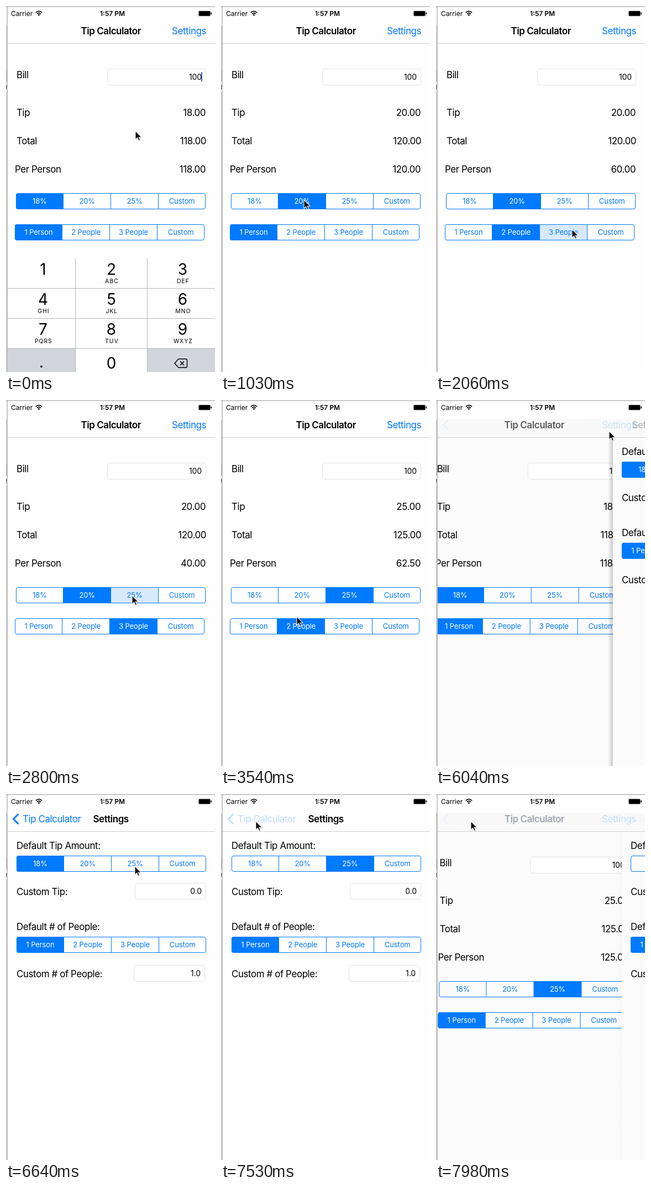
These frames come from a looping animation (378 by 659 pixels, 8000 ms). An HTML page:

```html
<!DOCTYPE html>
<html lang="en">
<head>
<meta charset="utf-8">
<title>Tip Calculator</title>
<style>
html, body { margin: 0; width: 100%; height: 100%; overflow: hidden; background: #fefefe; }
svg { display: block; width: 378px; height: 659px; }
text { font: 17px Inter, "Open Sans", sans-serif; letter-spacing: -.45px; fill: #000; white-space: pre; }
.bold { font-weight: 600; }
.blue { fill: #007aff; }
.end { text-anchor: end; }
.mid { text-anchor: middle; }
.small { font-size: 12px; letter-spacing: 0; }
.entry { font-size: 14px; letter-spacing: -.1px; }
.seg text { font-size: 13px; letter-spacing: -.1px; fill: #007aff; }
.cell rect { fill: none; }
.cell.down rect { fill: #d8e9fc; }
.cell.on rect { fill: #007aff; }
.cell.on text { fill: #fff; }
.frame { fill: none; stroke: #007aff; }
.field { fill: #fff; stroke: #e3e3e3; }
.digit { font-size: 28px; letter-spacing: 0; }
.letters { font-size: 10.5px; letter-spacing: .9px; }
.rule { stroke: #b6b8bb; }
</style>
</head>
<body>
<svg id="stage" viewBox="0 0 378 659"></svg>
<script>
const LOOP = 8000, STEP = 147.5, BLUE = '#007aff';
const TIPS = [18, 20, 25], BILL = 100;
const $ = id => document.getElementById(id);

const text = (x, y, str, cls = '', id = '') =>
  `<text x="${x}" y="${y}" class="${cls}"${id && ` id="${id}"`}>${str}</text>`;
const rect = (x, y, w, h, rest = '') =>
  `<rect x="${x}" y="${y}" width="${w}" height="${h}" ${rest}/>`;
const field = (x, y, w, value) =>
  rect(x + .5, y + .5, w, 29, 'rx="4" class="field"') + text(x + w - 7, y + 20, value, 'entry end');

function segments(id, x, y, labels) {
  const cells = labels.map((label, i) =>
    `<g class="cell">${rect(i * 85.75, 0, 86, 29)}${text(i * 85.75 + 43, 19.2, label, 'mid')}</g>`).join('');
  const dividers = [1, 2, 3].map(i => `M${i * 86 - .5} 0V29`).join('');
  return `<g class="seg" id="${id}" transform="translate(${x} ${y})">
    <g clip-path="url(#pill)">${cells}</g>
    ${rect(.5, .5, 342, 28, 'rx="3.5" class="frame"')}<path d="${dividers}" class="frame"/></g>`;
}
const tipLabels = ['18%', '20%', '25%', 'Custom'];
const peopleLabels = ['1 Person', '2 People', '3 People', 'Custom'];

function keyboard() {
  const centers = [67, 190.5, 319.5];
  const letters = ['', 'ABC', 'DEF', 'GHI', 'JKL', 'MNO', 'PQRS', 'TUV', 'WXYZ'];
  const keys = letters.map((s, i) => {
    const x = centers[i % 3], y = 454 + 54 * Math.floor(i / 3);
    return text(x, y + 30, i + 1, 'digit mid') + text(x + .8, y + 45, s, 'letters mid');
  }).join('');
  return `<g id="keyboard">${rect(3, 454, 375, 216, 'fill="#fefefe"')}
    ${rect(3, 616, 122, 54, 'fill="#d2d5db"')}${rect(256, 616, 122, 54, 'fill="#d2d5db"')}
    <path class="rule" d="M125.5 454V670M255.5 454V670M3 508.5H378M3 562.5H378M3 616.5H378"/>
    ${keys}${text(190.5, 653, '0', 'digit mid')}${text(64, 651, '.', 'digit mid')}
    <path d="M312 635.5H325Q327.500 635.500 327.500 638V648.500Q327.500 651 325 651H312L305 643.200ZM315 639.500L322 647M322 639.500L315 647"
      fill="none" stroke="#000" stroke-width="1.4" stroke-linejoin="round"/></g>`;
}

$('stage').innerHTML = `
<defs>
  <clipPath id="pill">${rect(0, 0, 343, 29, 'rx="4"')}</clipPath>
  <clipPath id="screen">${rect(3, 2, 375, 657)}</clipPath>
  <linearGradient id="fade"><stop stop-color="#000" stop-opacity="0"/><stop offset="1" stop-color="#000"/></linearGradient>
</defs>
${rect(0, 0, 378, 659, 'fill="#cbcbcb"')}
${rect(0, 3, 2, 33, 'fill="#ececec"')}${rect(0, 116, 2, 20, 'fill="#bcbcbc"')}${rect(0, 136, 2, 18, 'fill="#dedede"')}
<path d="M0 36.500H2M2.500 0V659" stroke="#b0b0b0"/>
<path d="M.5 142V150M0 144.500H2" stroke="#555"/>
<g clip-path="url(#screen)">
  ${rect(3, 2, 375, 657, 'fill="#fefefe"')}
  <g id="main">
    ${rect(-120, 68, 520, 600, 'class="paper"')}
    ${text(19, 129.5, 'Bill')}${field(183, 113, 178, BILL)}
    ${rect(353, 119, 2, 17, 'fill="#4364d6" id="caret"')}
    ${text(19, 197.5, 'Tip')}${text(361, 197.5, '', 'end', 'tip')}
    ${text(19, 248.5, 'Total')}${text(362, 248.5, '', 'end', 'total')}
    ${text(16, 299.5, 'Per Person')}${text(361, 299.5, '', 'end', 'each')}
    ${segments('mainTip', 18, 337, tipLabels)}${segments('mainPeople', 16, 393, peopleLabels)}
  </g>
  <g id="settings">
    ${rect(-6, 68, 9, 600, 'fill="url(#fade)" id="shadow"')}
    ${rect(3, 68, 375, 600, 'class="paper"')}
    ${text(19, 98.5, 'Default Tip Amount:')}${segments('defTip', 19, 111, tipLabels)}
    ${text(19, 181.5, 'Custom Tip:')}${field(233, 160, 128, '0.0')}
    ${text(19, 244.5, 'Default # of People:')}${segments('defPeople', 19, 257, peopleLabels)}
    ${text(19, 329.5, 'Custom # of People:')}${field(231, 308, 128, '1.0')}
  </g>
  ${keyboard()}
  ${rect(3, 2, 375, 65, 'fill="#fefefe"')}${rect(3, 34, 375, 33, 'id="bar"')}
  <path d="M3 67.500H378" stroke="#cfcfcf"/>
  ${text(135.5, 51, 'Tip Calculator', 'bold', 'title')}
  ${text(362, 51, 'Settings', 'blue end', 'action')}
  ${text(157.5, 51, 'Settings', 'bold', 'nextTitle')}
  ${text(30, 51, 'Tip Calculator', 'blue', 'backLabel')}
  <path id="chevron" d="M22.500 36L13.500 45L22.500 54" fill="none" stroke="${BLUE}" stroke-width="3"/>
  ${text(9, 17.5, 'Carrier', 'small')}${text(192.5, 17.5, '1:57 PM', 'small bold mid')}
  <path d="M53.800 12Q59.500 6.600 65.200 12M56 14.300Q59.500 11 63 14.300" fill="none" stroke="#000" stroke-width="1.700"/>
  <path d="M57.500 15.600Q59.500 14 61.500 15.600L59.500 18Z"/>
  ${rect(348.5, 9, 21, 9, 'rx="1.5" stroke="#777" stroke-width=".6"')}${rect(370.5, 11.5, 1.5, 4, 'rx=".7"')}
</g>
<g id="cursor">
  <path d="M0 0V15.500L3.600 12.200L6 17.500L8.600 16.400L6.200 11.200H11Z" transform="translate(.8 1.200)" opacity=".2"/>
  <path d="M0 0V15.500L3.600 12.200L6 17.500L8.600 16.400L6.200 11.200H11Z" stroke="#fff" stroke-width="1.100"/>
</g>`;

// [step, x, y]
const cursorPath = [
  [0, 234, 225], [2, 234, 225], [5, 150, 349], [8, 150, 349], [10, 142, 400], [12, 142, 400],
  [14, 246, 402], [16, 246, 402], [18, 228, 352], [20, 228, 352], [22, 137, 390], [24, 137, 390],
  [26, 62, 349], [29, 62, 349], [30, 47, 399], [32, 47, 399], [33, 133, 261], [37, 313, 56],
  [42, 313, 56], [45, 233, 130], [48, 233, 130], [51, 63, 49], [55, 63, 49]];

// [step, value] held until the next entry
const tipChoice = [[0, 0], [7, 1], [20, 2], [28, 0], [52, 2]];
const peopleChoice = [[0, 0], [11, 1], [15, 2], [23, 1], [31, 0]];
const defaultTip = [[0, 0], [47, 2]];
const tipPress = { 6: 1, 19: 2, 27: 0 };
const peoplePress = { 10: 1, 14: 2, 22: 1, 30: 0 };
const slide = [[0, 0], [41, .155], [42, .74], [43, .95], [44, 1], [53, .5], [54, .112]];
const keyboardDrop = [[0, 0], [3, 110], [4, 220]];

const held = (track, k) => track.findLast(([step]) => step <= k)[1];

function along(path, k) {
  const i = path.findIndex(([step]) => step > k);
  const [a, ax, ay] = path[i - 1], [b, bx, by] = path[i];
  const f = (k - a) / (b - a);
  return [ax + (bx - ax) * f, ay + (by - ay) * f];
}
const move = (id, x, y = 0) => $(id).setAttribute('transform', `translate(${x} ${y})`);
const show = (id, alpha) => $(id).setAttribute('opacity', Math.max(0, Math.min(1, alpha)));

function choose(id, on, down) {
  $(id).querySelectorAll('.cell').forEach((cell, i) => {
    cell.classList.toggle('on', i === on);
    cell.classList.toggle('down', i === down && i !== on);
  });
}

function drawPages(k) {
  const p = held(slide, k), pushing = k < 48, moving = p > 0 && p < 1;
  move('main', -112 * p);
  move('settings', 375 * (1 - p));
  $('settings').style.display = p ? '' : 'none';
  show('shadow', pushing ? .2 : .2 * p);
  document.querySelectorAll('.paper').forEach(el => el.setAttribute('fill', moving ? '#fbfbfb' : '#fefefe'));
  $('bar').setAttribute('fill', moving ? '#f9f9f9' : '#fefefe');

  const nav = pushing ? p ** 1.17 : p;
  move('title', -106 * nav);
  show('title', 1 - (pushing ? 2.4 : 6.2) * p);
  show('action', pushing ? (k >= 39 ? .22 * (1 - p) : 1) : 1 - 7 * p);
  move('nextTitle', 233 * (1 - p));
  show('nextTitle', pushing ? p * 1.6 : p * p);
  const pressed = k === 51 || k === 52 ? .25 : 1;
  move('backLabel', 106 * (1 - p));
  show('backLabel', pressed * (pushing ? p * p : p ** 1.1));
  show('chevron', pressed * p ** 1.5);
}

function draw(k) {
  const tip = held(tipChoice, k), people = held(peopleChoice, k);
  const amount = BILL * TIPS[tip] / 100, total = BILL + amount;
  $('tip').textContent = amount.toFixed(2);
  $('total').textContent = total.toFixed(2);
  $('each').textContent = (total / (people + 1)).toFixed(2);
  choose('mainTip', tip, tipPress[k]);
  choose('mainPeople', people, peoplePress[k]);
  choose('defTip', held(defaultTip, k), k === 46 ? 2 : -1);
  choose('defPeople', 0);
  show('caret', k < 3 ? 1 : 0);
  move('keyboard', 0, held(keyboardDrop, k));
  drawPages(k);
  move('cursor', ...along(cursorPath, k));
}

let last = -1;
function tick() {
  const k = Math.min(54, Math.floor((performance.now() % LOOP + 11) / STEP));
  if (k !== last) draw(last = k);
  requestAnimationFrame(tick);
}
tick();
</script>
</body>
</html>
```
